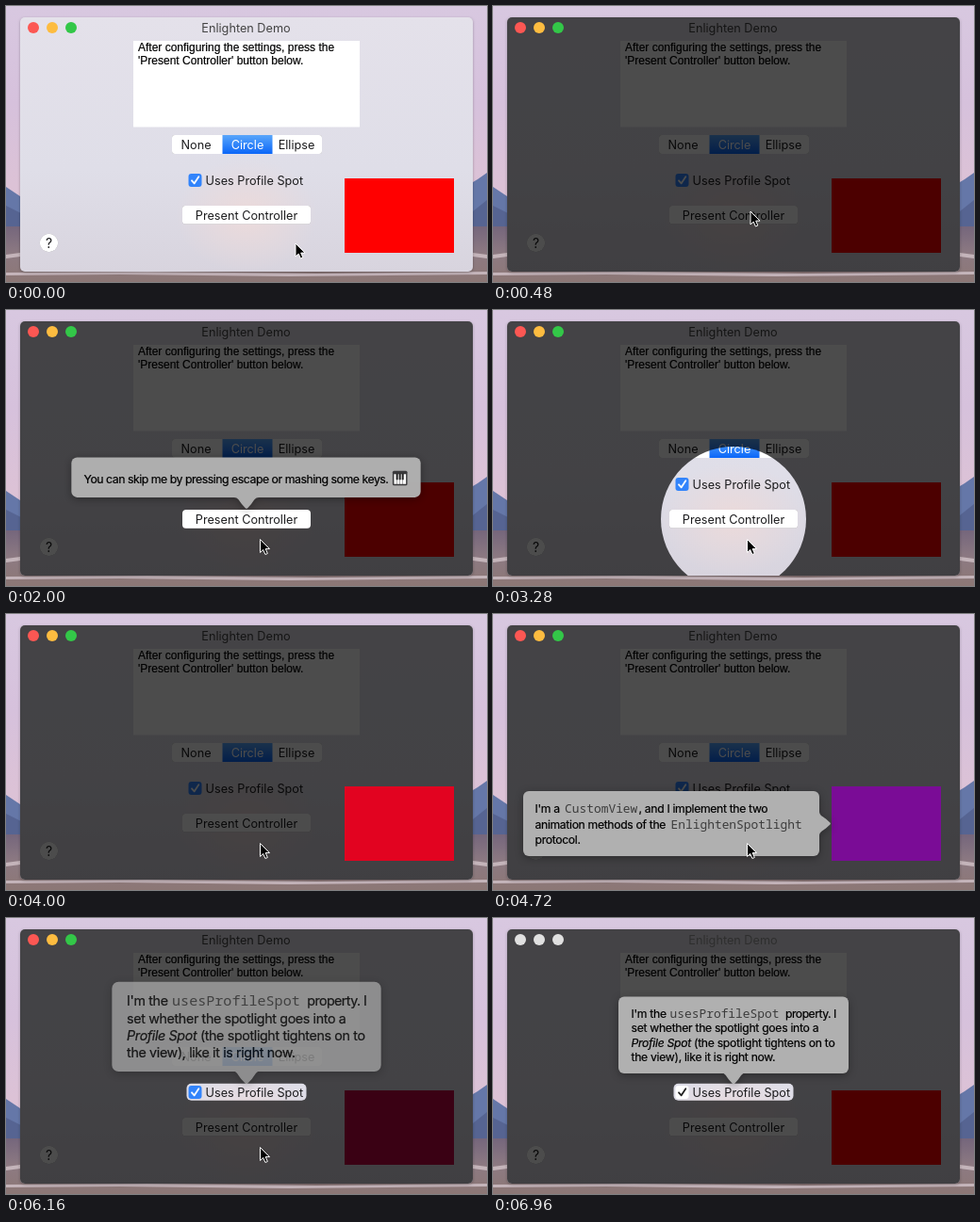
These frames come from a looping animation (510x293 px, 7.04 s). An HTML page:

```html
<!DOCTYPE html>
<html lang="en">
<head>
<meta charset="utf-8">
<title>Enlighten Demo</title>
<style>
  html, body { margin: 0; width: 100%; height: 100%; overflow: hidden; }
  svg { display: block; width: 510px; height: 293px; }
  text { font: 12.7px Inter, Roboto, sans-serif; fill: #1c1c1e; }
  .mid { text-anchor: middle; }
  .plain { font: 12px "Liberation Sans", Arial, sans-serif; fill: #000; stroke: #000; stroke-width: .2px; }
  .pop { filter: drop-shadow(0 2px 4px #0005); }
  .pop rect.body, .pop .arrow { fill: #b0b0b0; }
  .pop text { font-size: 12.2px; fill: #000; stroke: #000; stroke-width: .2px; }
  .pop .code { font: 12.9px "Noto Sans Mono", "DejaVu Sans Mono", monospace; fill: #3c3c3c; stroke: none; letter-spacing: 0; }
  .control { fill: #fff; filter: drop-shadow(0 .5px .6px #0006); }
</style>
</head>
<body>
<svg viewBox="0 0 510 293">
  <defs>
    <linearGradient id="sky" x2="0" y2="1">
      <stop offset="0" stop-color="#d8c8e0"/>
      <stop offset=".35" stop-color="#d6c1dc"/>
      <stop offset=".65" stop-color="#dcc2d6"/>
    </linearGradient>
    <linearGradient id="ground" x2="0" y2="1">
      <stop offset="0" stop-color="#75667c"/>
      <stop offset=".5" stop-color="#8d7a82"/>
      <stop offset="1" stop-color="#8c7775"/>
    </linearGradient>
    <linearGradient id="pane" x2="0" y2="1">
      <stop offset="0" stop-color="#e4e1ea"/>
      <stop offset=".6" stop-color="#dfdee8"/>
      <stop offset="1" stop-color="#d8d4de"/>
    </linearGradient>
    <radialGradient id="glow">
      <stop offset="0" stop-color="#ecdada"/>
      <stop offset="1" stop-color="#ecdada" stop-opacity="0"/>
    </radialGradient>
    <linearGradient id="blue" x2="0" y2="1">
      <stop offset="0" stop-color="#59a6fb"/>
      <stop offset="1" stop-color="#0a66f8"/>
    </linearGradient>
    <path id="arrow" d="M-13 -12.5V-12C-9 -12 -8 -9 -5 -5L-1 -.6Q0 .3 1 -.6L5 -5C8 -9 9 -12 13 -12V-12.5Z"/>
    <mask id="hole" maskUnits="userSpaceOnUse" x="0" y="0" width="510" height="293">
      <rect width="510" height="293" fill="#fff"/>
      <rect id="spot"/>
    </mask>
  </defs>

  <!-- Desktop -->
  <rect width="510" height="293" fill="url(#sky)"/>
  <path d="M0 192L9 198L30 212L480 196L500 184L510 177V240H0Z" fill="#6577a8"/>
  <path d="M0 212L20 222H490L510 206V240H0Z" fill="#566492"/>
  <rect y="234" width="510" height="59" fill="url(#ground)"/>
  <path d="M0 264L15 262V266L0 268ZM495 262L510 264V268L495 266ZM0 283L150 282L330 284L510 282V285L300 287L120 285L0 286Z" fill="#c4b4ba"/>

  <!-- Window -->
  <rect x="15" y="12" width="480" height="270" rx="5" fill="url(#pane)" style="filter:drop-shadow(0 1px 1.5px #0004)"/>
  <ellipse cx="255" cy="222" rx="75" ry="60" fill="url(#glow)"/>
  <text id="title" class="mid" x="254.5" y="27.5">Enlighten Demo</text>
  <rect x="135" y="37" width="240" height="91.5" fill="#fff"/>
  <text class="plain" x="140" y="48">After configuring the settings, press the</text>
  <text class="plain" x="140" y="62">'Present Controller' button below.</text>

  <rect class="control" x="176" y="137" width="159" height="20" rx="3"/>
  <rect x="229.5" y="137" width="53" height="20" fill="url(#blue)"/>
  <text class="mid" x="201.5" y="151.5">None</text>
  <text class="mid" x="256" y="151.5" style="fill:#fff">Circle</text>
  <text class="mid" x="308" y="151.5">Ellipse</text>

  <rect id="box" x="193.5" y="178" width="14" height="14" rx="3"/>
  <path id="tick" d="M197 185.3L199.7 188.3L204.3 181.3" fill="none" stroke-width="1.8" stroke-linecap="round" stroke-linejoin="round"/>
  <text x="211.5" y="189.5">Uses Profile Spot</text>

  <rect class="control" x="187" y="212" width="136" height="19.5" rx="3"/>
  <text class="mid" x="255" y="226.5">Present Controller</text>
  <rect id="custom" x="359" y="183" width="116" height="79"/>
  <circle class="control" cx="45.5" cy="251.5" r="9.7"/>
  <text class="mid" x="45.5" y="256.5" style="font-size:14px">?</text>

  <rect id="dim" x="15" y="12" width="480" height="270" rx="5" mask="url(#hole)"/>
  <g id="lights">
    <circle cx="29" cy="23" r="6"/>
    <circle cx="49" cy="23" r="6"/>
    <circle cx="69" cy="23" r="6"/>
  </g>

  <!-- Popovers -->
  <g class="pop" letter-spacing="-.47">
    <rect class="body" x="71" y="157" width="367" height="42" rx="6"/>
    <use class="arrow" href="#arrow" transform="translate(255 211)"/>
    <text x="84" y="184">You can skip me by pressing escape or mashing some keys.</text>
    <rect x="408.5" y="171" width="15.5" height="15.5" rx="1.5" fill="#3a3a3c"/>
    <path d="M410 174.5h3v10.5h-3zM413.4 174.5h2.6v10.5h-2.6zM416.4 174.5h2.6v10.5h-2.6zM419.4 174.5h3.2v10.5h-3.2z" fill="#fff"/>
    <path d="M412.2 174v6.5h2v-6.5zM415.2 174v6.5h2v-6.5zM418.2 174v6.5h2v-6.5z" fill="#222"/>
  </g>
  <g class="pop" letter-spacing="-.33">
    <rect class="body" x="32" y="188" width="314" height="69" rx="6"/>
    <use class="arrow" href="#arrow" transform="translate(358 222.5) rotate(-90)"/>
    <text x="44.5" y="211">I'm a</text>
    <text class="code" x="76" y="211">CustomView</text>
    <text x="154.5" y="211">, and I implement the two</text>
    <text x="44.5" y="227.5">animation methods of the</text>
    <text class="code" x="188.5" y="227.5">EnlightenSpotlight</text>
    <text x="44.5" y="244">protocol.</text>
  </g>
  <g class="pop" letter-spacing="-.3">
    <rect class="body" x="133" y="83.5" width="244" height="81.5" rx="6"/>
    <use class="arrow" href="#arrow" transform="translate(255 176.5)"/>
    <text x="146.5" y="105.5">I'm the</text>
    <text class="code" x="187.5" y="105.5">usesProfileSpot</text>
    <text x="310" y="105.5" letter-spacing="-.5">property. I</text>
    <text x="146.5" y="121">set whether the spotlight goes into a</text>
    <text x="146.5" y="136.5"><tspan font-style="italic">Profile Spot</tspan> (the spotlight tightens on to</text>
    <text x="146.5" y="152">the view), like it is right now.</text>
  </g>

  <path id="cursor" d="M0 0V14L3.2 11L5.4 16L7.8 15L5.7 10.1H10Z" stroke="#fff" stroke-width="1" stroke-linejoin="round"/>
</svg>

<script>
const LOOP = 7040, STEP = 80;
const byId = id => document.getElementById(id);
const set = (el, attrs) => { for (const k in attrs) el.setAttribute(k, attrs[k]); };
const clamp = v => Math.min(1, Math.max(0, v));
const ease = u => u * u * (3 - 2 * u);

// Eased value of a track of [time, ...values] at time t
function at(track, t) {
  let i = track.findIndex(k => k[0] > t);
  if (i < 0) i = track.length;
  const from = track[Math.max(0, i - 1)], to = track[Math.min(i, track.length - 1)];
  const u = from === to ? 0 : ease(clamp((t - from[0]) / (to[0] - from[0])));
  return from.slice(1).map((v, n) => v + (to[n + 1] - v) * u);
}

// Spotlight shapes: centre, size, corner radius
const circle = (x, y, r) => [x, y, 2 * r, 2 * r, r];
const buttonSpot = circle(255, 222, 77), button = [255, 222, 136, 20, 4];
const customSpot = circle(417, 222.5, 78), custom = [417, 222.5, 116, 79, 0];
const checkSpot = circle(255, 185, 69), check = [255, 184.7, 127, 18, 5];

const spotTrack = [
  [560, ...circle(255, 222, 0)], [1200, ...buttonSpot],
  [1600, ...buttonSpot], [1840, ...button],
  [3040, ...button], [3280, ...buttonSpot],
  [3360, ...buttonSpot], [3680, ...customSpot],
  [3760, ...customSpot], [4000, ...custom],
  [5040, ...custom], [5360, ...customSpot],
  [5440, ...customSpot], [5760, ...checkSpot],
  [5800, ...checkSpot], [6080, ...check]
];
const cursorTrack = [
  [80, 307, 252], [400, 273, 218], [720, 273, 218], [1200, 269.5, 243.5],
  [6480, 269.5, 243.5], [6720, 266, 296]
];
const dimTrack = [[240, 0], [480, .7]];
const colorTrack = [[3760, 255, 0, 0], [4560, 122, 12, 150], [5960, 122, 12, 150], [6340, 255, 0, 0]];

const popovers = [
  { open: 1840, close: 2640, tip: [255, 211] },
  { open: 4240, close: 4800, tip: [358, 222.5] },
  { open: 6080, close: LOOP, tip: [255, 176.5] }
];
const popElements = document.querySelectorAll('.pop');
const lights = byId('lights').children;

function draw(t) {
  const [cx, cy, w, h, r] = at(spotTrack, t);
  set(byId('spot'), { x: cx - w / 2, y: cy - h / 2, width: w, height: h, rx: r });
  set(byId('dim'), { 'fill-opacity': at(dimTrack, t)[0] });
  set(byId('custom'), { fill: `rgb(${at(colorTrack, t).map(Math.round)})` });
  set(byId('cursor'), { transform: `translate(${at(cursorTrack, t)})` });

  popovers.forEach(({ open, close, tip: [x, y] }, i) => {
    const shown = 1 - (1 - clamp((t - open) / 184)) ** 2;
    const scale = 1 + .53 * (1 - shown);
    set(popElements[i], {
      opacity: shown * (1 - clamp((t - close) / 240)),
      transform: `translate(${x} ${y}) scale(${scale}) translate(${-x} ${-y})`
    });
  });

  // The window loses focus at the end of the loop
  const inactive = t >= 6960;
  ['#fc5753', '#fdbc40', '#33c748'].forEach((c, i) => set(lights[i], { fill: inactive ? '#e0e0e0' : c }));
  set(byId('box'), { fill: inactive ? '#fff' : '#3284fb' });
  set(byId('tick'), { stroke: inactive ? '#222' : '#fff' });
  byId('title').style.fill = inactive ? '#999' : '#444';
}

const start = performance.now();
function frame() {
  const t = (performance.now() - start) % LOOP;
  draw(Math.floor(t / STEP) * STEP);
  requestAnimationFrame(frame);
}
frame();
</script>
</body>
</html>
```
